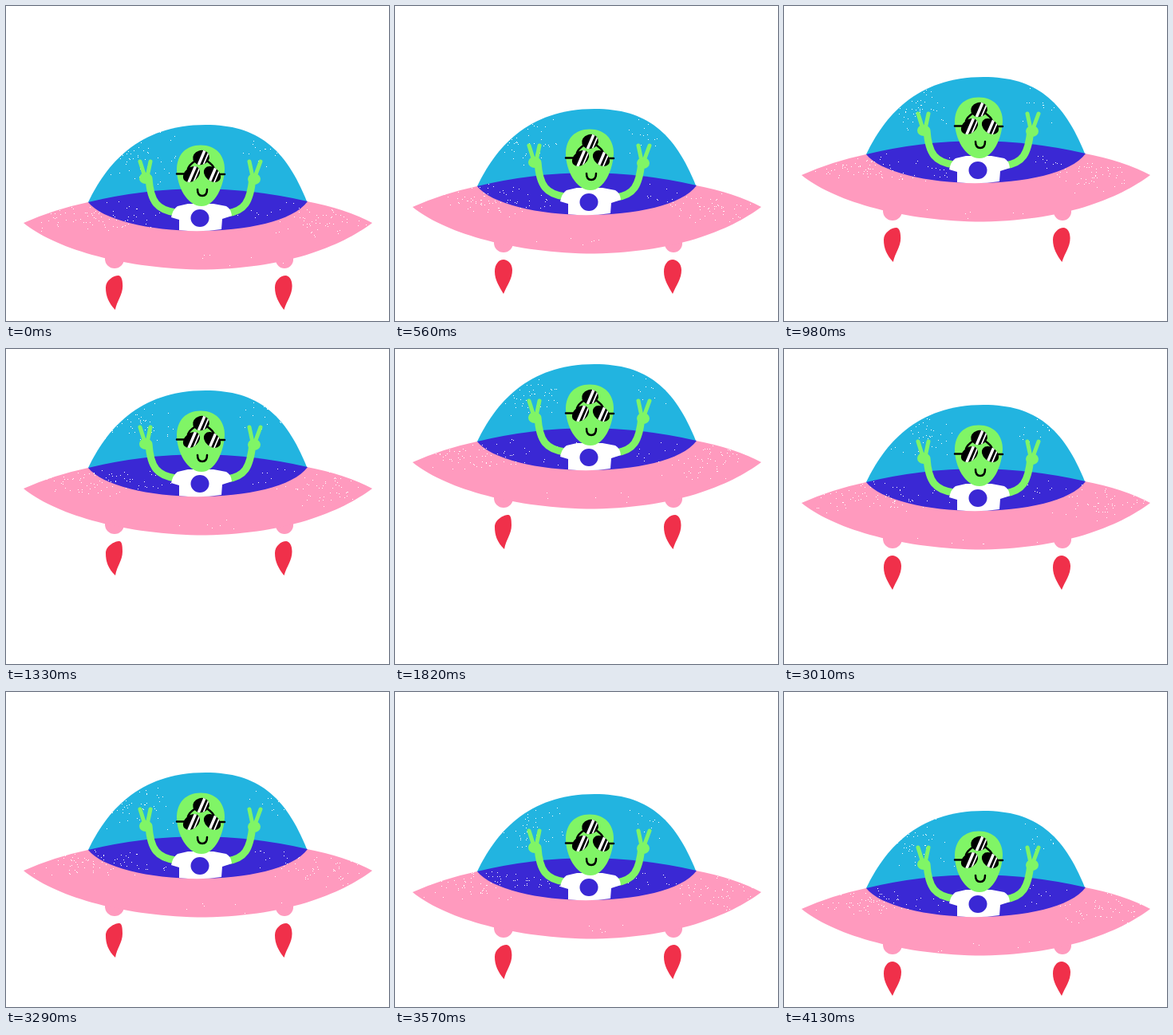
Recreate the animation shown at these times as an HTML page with a canvas. Size 480 by 395 pixels, loop 4200 ms.

```html
<!DOCTYPE html>
<html lang="en">
<head>
<meta charset="utf-8">
<title>Flying saucer</title>
<style>
html, body { margin: 0; width: 100%; height: 100%; overflow: hidden; background: #fff; }
canvas { display: block; }
</style>
</head>
<body>
<canvas id="stage" width="480" height="395"></canvas>
<script>
const ctx = document.getElementById('stage').getContext('2d');
const LOOP = 4200, STEP = 70, RISE = 135;
const PINK = '#ff9abe', SKY = '#22b4e0', INDIGO = '#3a28d4',
      RED = '#f0304a', GREEN = '#80f566', BLACK = '#000', WHITE = '#fff';

const DOME = new Path2D('M103 246C125 200 165 149 250 149C315 149 350 178 377 245Q240 275 103 246Z');
const HULL = new Path2D('M22 272Q60 255 103 246L377 245Q425 254 459 272' +
  'C420 301 350 330.5 240 330.5C140 328 60 303 22 272Z');
const FLOOR = new Path2D('M103 246Q240 213 378 245C360 270 300 282 240 282C180 282 120 268 103 246Z');
const SHIRT = new Path2D('M228 248L215 251Q209 255 207 265L217 268L217 281' +
  'Q243 284 270 280L271 267L283 263Q282 254 276 251L260 248Z');
const HEAD = new Path2D('M244 174.5C263 174.5 274 187 274 205C273 226 262 251 245 251' +
  'C227 251 214 226 214 205C214 187 225 174.5 244 174.5Z');

// How far the flames bend on successive drawings
const LEANS = [0.8, 0, 0.6, 0, 0.3, 1, 0.4];

// Grain patches: x, y, half width, half height, count
const GRAIN = [
  [110, 264, 85, 22, 75], [395, 272, 65, 24, 55], [250, 318, 110, 10, 6],
  [167, 190, 50, 36, 50], [325, 182, 45, 28, 18], [205, 262, 60, 16, 12], [325, 258, 40, 18, 10]
];

function random(seed) {
  let s = seed * 7919 + 17;
  return () => (s = (s * 16807) % 2147483647) / 2147483647;
}

function fill(path, color) {
  ctx.fillStyle = color;
  ctx.fill(path);
}

function stroke(path, width, color) {
  ctx.lineWidth = width;
  ctx.strokeStyle = color;
  ctx.stroke(new Path2D(path));
}

function oval(x, y, rx, ry, color, turn = 0) {
  const path = new Path2D();
  path.ellipse(x, y, rx, ry, turn, 0, 7);
  fill(path, color);
  return path;
}

// Cubic ease-in-out with handles at .42 and .58
function ease(x) {
  let lo = 0, hi = 1;
  for (let i = 0; i < 20; i++) {
    const s = (lo + hi) / 2, r = 1 - s;
    if (1.26 * s * r * r + 1.74 * s * s * r + s * s * s < x) lo = s; else hi = s;
  }
  return lo * lo * (3 - 2 * lo);
}

function lift(t) {
  const x = t < 2090 ? (t - 10) / 2080 : (4130 - t) / 2030;
  return -RISE * ease(Math.min(1, Math.max(0, x)));
}

function flame(x, lean) {
  const top = 6 * lean, side = 11 - lean;
  ctx.save();
  ctx.translate(x, 338);
  fill(new Path2D(`M${lean} 43C${-5 - 3 * lean} 34 -11 26 -11 15` +
    `C-11 6 ${top - 6} 0 ${top} 0C${top + 5 - 2 * lean} 0 ${side} 5 ${side} 13` +
    `C${side} 24 ${5 - 2 * lean} 31 ${lean} 43Z`), RED);
  ctx.restore();
}

function grain(frame) {
  const rnd = random(frame + 1);
  ctx.fillStyle = WHITE;
  for (const [x, y, w, h, count] of GRAIN) {
    for (let i = 0; i < count; i++) {
      const dx = (rnd() + rnd() - 1) * w, dy = (rnd() + rnd() - 1) * h;
      ctx.fillRect(Math.round(x + dx), Math.round(y + dy), 1, 1);
    }
  }
}

function lens(x, y, rx, ry, turn) {
  const shape = oval(x, y, rx, ry, BLACK, turn);
  ctx.save();
  ctx.clip(shape);
  stroke(`M${x - 4} ${y + 11}L${x + 5} ${y - 10}`, 3.5, WHITE);
  stroke(`M${x + 2} ${y + 11}L${x + 11} ${y - 10}`, 1.8, WHITE);
  ctx.restore();
}

function alien() {
  stroke('M179 216C181 246 190 256 213 259', 9, GREEN);
  stroke('M309 216C306 246 299 257 277 260', 9, GREEN);
  stroke('M174 214L168 195M177 214L181 195', 5, GREEN);
  stroke('M309 214L305 195M312 214L319 195', 5, GREEN);
  oval(175, 216, 8, 7, GREEN);
  oval(311, 217, 8, 7, GREEN);

  fill(SHIRT, WHITE);
  oval(243, 266, 11.5, 11, INDIGO);
  fill(HEAD, GREEN);

  stroke('M214 210.5H224M266 211H274M236 195Q230 199 228 204M253 195Q259 199 261 204', 2.5, BLACK);
  lens(244.5, 190, 10.5, 9, -0.3);
  lens(232.5, 211, 11.8, 8.5, -0.7);
  lens(258.5, 211, 11.8, 8.5, 0.7);
  stroke('M240 230Q240 238 246 238Q252 238 252 230', 2.5, BLACK);
}

function draw(now) {
  const frame = Math.floor((now % LOOP) / STEP);
  const lean = LEANS[frame % LEANS.length];
  ctx.fillStyle = WHITE;
  ctx.fillRect(0, 0, 480, 395);
  ctx.lineCap = 'round';
  ctx.save();
  ctx.translate(0, Math.round(lift(frame * STEP)));
  flame(136, lean);
  flame(348, lean * 0.5);
  oval(136, 317, 12, 12, PINK);
  oval(349, 318, 11, 11, PINK);
  fill(HULL, PINK);
  fill(DOME, SKY);
  fill(FLOOR, INDIGO);
  grain(frame);
  alien();
  ctx.restore();
}

const start = performance.now();
function tick() {
  draw(performance.now() - start);
  requestAnimationFrame(tick);
}
tick();
</script>
</body>
</html>
```
